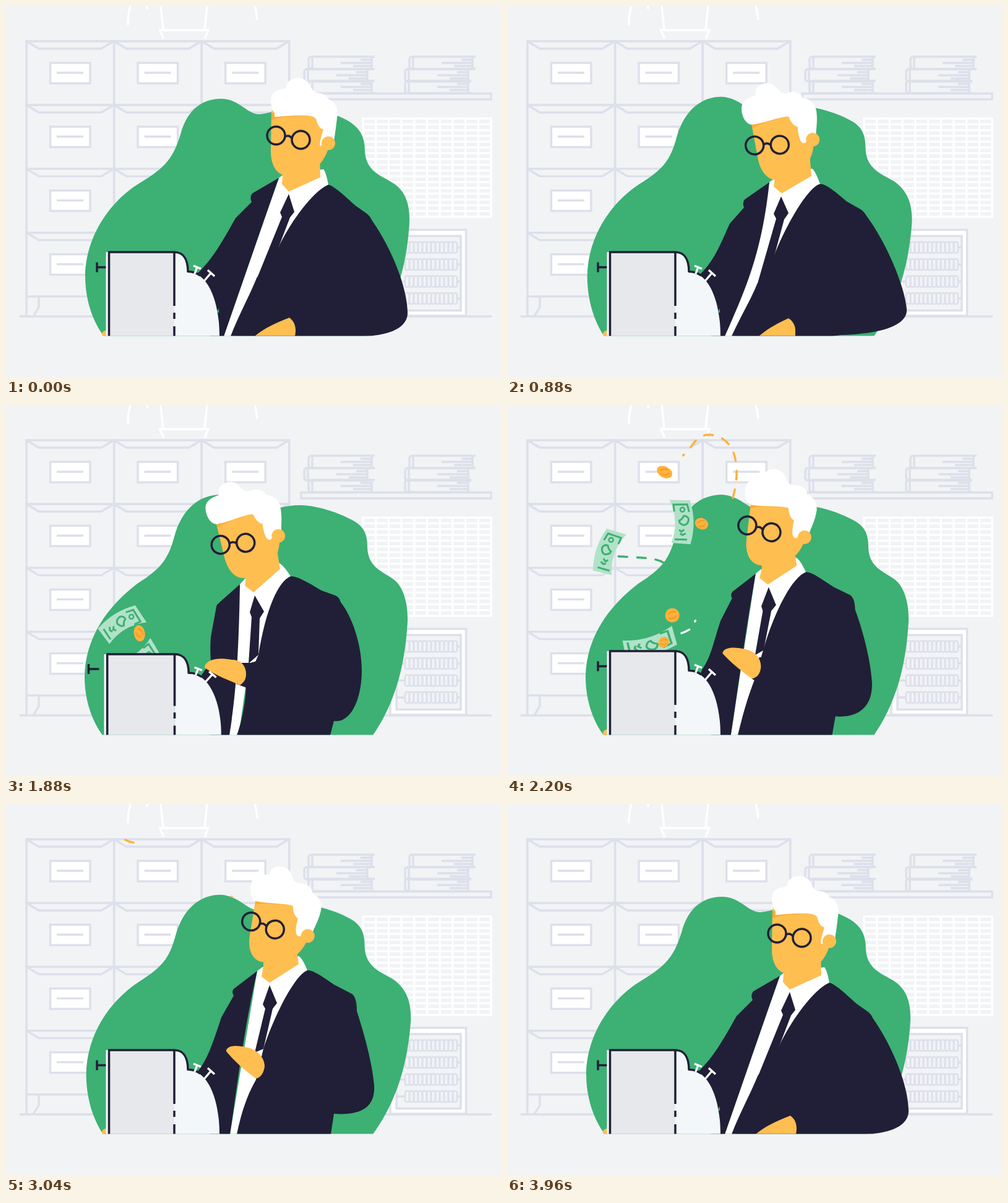
Recreate the animation shown at these times as an HTML page. Size 800 by 600 pixels, loop 4000 ms.

```html
<!DOCTYPE html>
<html lang="en">
<head>
<meta charset="utf-8">
<title>Accountant at the money machine</title>
<style>
html, body { margin: 0; width: 100%; height: 100%; overflow: hidden; background: #f1f3f5; }
svg { display: block; width: 100vw; height: 100vh; }
.line { fill: none; stroke: #dddfea; stroke-width: 3.4; }
.white { fill: none; stroke: #fff; stroke-width: 3.4; }
.ink { fill: none; stroke: #211f37; stroke-width: 3.5; }
.navy { fill: #211f37; }
.skin { fill: #ffbe50; }
.trail { fill: none; stroke-width: 3.4; stroke-linecap: round; }
</style>
</head>
<body>
<svg viewBox="0 0 800 600">
  <defs>
    <clipPath id="desk"><rect width="800" height="533.5"/></clipPath>
    <g id="note">
      <path d="M-21 -33L12 -35Q26 0 18 36L-13 36Q-2 0 -21 -33Z" fill="#b1e2c8"/>
      <path d="M-12 -15L-14 -26L8 -28L12 -16M-8 30L12 29M-2 14l4 3 4 -4M0 20l4 2 5 -3M4 -9a7 6 0 0 1 8 7q-1 7 -7 8q-8 -2 -8 -7q4 -1 7 -8Z" fill="none" stroke="#3db074" stroke-width="3"/>
      <circle cx="1" cy="-19" r="3.5" fill="none" stroke="#3db074" stroke-width="2.5"/>
    </g>
    <g id="coin">
      <ellipse rx="12" ry="10" fill="#ffb13c"/>
      <path d="M-7 2Q-5 -6 3 -6M-3 6Q5 5 6 -2" fill="none" stroke="#f39a24" stroke-width="2"/>
    </g>
  </defs>
  <g id="room"></g>
  <g clip-path="url(#desk)">
    <path id="blob" fill="#3db074"/>
  </g>
  <g id="money"></g>
  <g clip-path="url(#desk)">
    <path id="shirt" fill="#fff"/>
    <path id="left" class="navy"/>
    <path id="gap" fill="#3db074"/>
    <path id="tie" class="navy"/>
    <path id="jacket" class="navy"/>
    <path id="sleeve" class="navy"/>
    <path id="neck" class="skin"/>
    <g id="head">
      <path class="skin" d="M398 160L397 226C397 250 408 265 424 265L450 264L477 245C487 234 493 215 494 200L460 150Z"/>
      <path d="M398 164V175Q418 168 444 169Z" fill="#fbab35"/>
      <path id="hair" fill="#fff"/>
      <circle class="skin" cx="490" cy="212.5" r="11"/>
      <g id="glasses" class="ink">
        <circle cx="396" cy="203" r="14.5"/>
        <circle cx="436" cy="210" r="14.5"/>
        <path d="M410 205Q417 201 422 208"/>
      </g>
    </g>
    <path id="hand" class="skin"/>
    <circle id="thumb" class="skin" cx="161"/>
    <path id="lever" class="ink" d="M147 414.5V430.5M147 422.5H164"/>
    <g id="machine">
      <path d="M161.5 398H168V534H161.5Z" fill="#f3f7f9"/>
      <path d="M272 398C288 398 294 412 294 430C325 430 345 475 345 534H272Z" fill="#f3f7f9"/>
      <path d="M166 398H272V534H166Z" fill="#e7e8ec"/>
      <path class="ink" stroke-linejoin="round" d="M166.5 534V398H272C288 398 294 412 294 429.5Q304 429 314 436M272 398V485M272 496V506M272 518V534"/>
      <path class="white" d="M303 420L315 425M309 422L305 433M326 427L337 437M331 432L320 445"/>
    </g>
  </g>
</svg>
<script>
const LOOP = 4000;
const $ = id => document.getElementById(id);
const svgTag = (cls, d) => `<path class="${cls}" d="${d}"/>`;

function drawRoom() {
  let out = svgTag('white', 'M250 0L254 38M325 0L321 38M255 53L248.5 39H327L321 53M201 0Q197 14 197 31M228 0V5M402 0Q405 10 406 23');
  out += svgTag('line', 'M22 502H785M33 470V502M53 470V487L44 502');
  for (let row = 0; row < 4; row++) for (let col = 0; col < 3; col++) {
    const x = 33 + col * 141.6, y = 57 + row * 103.2;
    out += svgTag('line', `M${x} ${y}h141.6v103.2h-141.6ZM${x} ${y}l20 12h101l20 -12`);
    out += `<rect class="line" style="fill:#fff" x="${x + 38.5}" y="${y + 35}" width="64.5" height="33"/>`;
    out += svgTag('line', `M${x + 49} ${y + 51}h43`);
  }
  const book = (x, y) => svgTag('line', `M${x + 107} ${y}H${x + 5}q-5 0 -5 5v10q0 5 5 5H${x + 107}M${x + 6} ${y}v20M${x + 102} ${y}v20M${x + 84} ${y + 5}h18M${x + 52} ${y + 10}h50M${x + 72} ${y + 15}h30`);
  out += [[489, 82], [482, 102], [489, 121], [652, 82], [645, 102], [645, 121]].map(p => book(...p)).join('');
  out += svgTag('line', 'M477 141.5H784V151H477Z');

  let grid = 'M577 182H784V341H577Z';
  for (let i = 1; i < 10; i++) grid += `M${784 - i * 20.7} 182V341`;
  for (let i = 1; i < 17; i++) grid += `M577 ${182 + i * 9.35}H784`;
  out += svgTag('white', grid);

  out += '<rect class="line" style="fill:#fff" x="621" y="362" width="122.5" height="139"/>';
  out += '<rect class="line" style="fill:#f1f3f5" x="631" y="372" width="104" height="120.5"/>';
  for (let row = 0; row < 4; row++) {
    const y = 390.5 + row * 27.5;
    out += svgTag('line', `M631 ${y}H645M729 ${y}H735`);
    for (let i = 0; i < 12; i++)
      out += `<rect class="line" style="stroke-width:2.6" x="${645 + i * 7}" y="${y - 9}" width="7" height="18" rx="3"/>`;
  }
  $('room').innerHTML = out;
}

const tuckedSleeve = 'M470 480L480 480L490 490L500 500L490 510L480 510L470 490Z';
const smallGap = 'M344 489L341 494L344 497Z';
const hiddenGap = 'M330 489L328 494L330 497Z';

// Head: dx, dy, rotation, turn towards the viewer.
const resting = {
  head: '31 9.5 0 1',
  left: 'M441 278L398 303Q393 309 397 317L371 343C350 380 335 408 310 432L300 470L330 534L352 534C382 448 411 363 441 278Z',
  gap: smallGap,
  shirt: 'M441 278L449 272L513 264Q517 268 521 289L436 402L405 445L370 534L352 534Z',
  tie: 'M457 304L466 333L459 342L436 402L405 442L446 341L443 334Z',
  jacket: 'M521 289C495 300 455 355 436 400L405 440C393 470 376 500 363 534L560 534L580 534C630 532 650 515 649 495C648 455 625 395 591 346Q588 339 582 335L565 323C545 305 530 291 521 289Z',
  sleeve: tuckedSleeve,
  neck: 'M447 260L447 275L446 288L457 300L508 277L507 242Z',
  hand: 'M402 534C415 523 430 515 458 504C466 510 468 518 468 525C468 530 467 533 467 534C440 535 420 535 402 534Z'
};
const lookingDown = {
  head: '4.5 18.5 -11.5 0',
  left: 'M424 285L384 313Q380 318 383 326L360 352C345 385 335 412 312 434L300 470L330 534L352 534C385 460 412 400 424 285Z',
  gap: smallGap,
  shirt: 'M424 285L432 279L493 263Q498 266 506 288L432 404L404 452L370 534L352 534Z',
  tie: 'M443 308L455 335L448 345L432 404L404 452L435 344L431 336Z',
  jacket: 'M506 288C490 290 455 345 432 403L404 450C394 475 376 505 363 534L526 534L540 532C610 530 648 515 646 490C643 455 615 385 580 338Q576 331 570 328L549 316C530 300 515 287 506 288Z',
  sleeve: tuckedSleeve,
  neck: 'M433 268L433 278L431 292L444 303L492 275L489 238Z',
  hand: 'M407 534C420 523 435 514 455 505C463 510 466 518 466 525C466 530 466 533 466 534C440 535 422 535 407 534Z'
};
const handRaised = {
  head: '0 0 0 0',
  left: 'M411 275L381 296Q370 310 362 330L345 350C330 390 320 410 300 428L300 470L330 534L357 534C380 470 385 400 411 275Z',
  gap: 'M351 464L338 484L346 504Z',
  shirt: 'M411 275L419 269L481 254Q486 256 493 279L430 372L399 430L372 534L357 534Z',
  tie: 'M429 298L440 326L432 334L428 370L414 354L419 333L416 324Z',
  jacket: 'M493 279C475 285 445 325 430 371L399 430C397 460 375 495 367 534L525 534L535 505C550 460 556 420 559 390C561 375 562 365 563 355Q569 325 556 319L535 311C518 295 503 278 493 279Z',
  sleeve: 'M358 336L388 318L430 371L460 400L399 430L384 404L366 350Z',
  neck: 'M421 255L420 268L418 284L429 293L479 267L476 234Z',
  hand: 'M347 281C346 272 356 270 366 277C378 288 384 302 388 318C387 332 373 341 360 339C356 320 350 300 347 281Z'
};
const pressing = {
  head: '-49 18 -14.5 0',
  left: 'M378 290L343 321Q341 322 340 326L331 375C330 390 330 400 331 415L300 460L330 534L361 534C370 480 376 420 378 290Z',
  gap: hiddenGap,
  shirt: 'M378 290L386 281L440 255Q447 257 460 277L408 405L388 450L376 534L361 534Z',
  tie: 'M402 308L417 334L410 345L408 404L392 418L397 343L394 335Z',
  jacket: 'M460 277C440 285 420 330 408 404L388 450C388 475 382 510 373 534L524 534L530 511C560 515 575 470 575 430C575 385 558 340 541 319Q539 311 532 308L510 300C490 288 470 276 460 277Z',
  sleeve: 'M378 417L395 417L420 410L440 440L420 470L388 457L372 451Z',
  neck: 'M388 265L388 277L386 292L400 303L443 265L437 228Z',
  hand: 'M321 423C325 410 345 408 365 412C380 412 388 422 388 435C388 445 383 450 378 453C360 445 340 438 321 425Z'
};
const watching = {
  head: '6 -14.5 13 0',
  left: 'M410 267L372 295Q367 302 372 308L350 340C335 380 330 410 310 432L300 470L330 534L362 534C372 470 385 370 410 267Z',
  gap: hiddenGap,
  shirt: 'M410 267L418 261L476 244Q482 246 491 268L417 395L404 443L376 534L362 534Z',
  tie: 'M430 290L441 320L433 329L417 394L404 400L419 330L417 322Z',
  jacket: 'M491 268C470 275 438 330 416 394L404 443C390 470 380 500 373 534L526 534L531 501C575 504 597 490 595 455C592 420 580 370 570 335Q570 310 560 306L535 293C515 280 500 267 491 268Z',
  sleeve: 'M418 405L425 405L450 420L450 450L430 460L412 446L404 440Z',
  neck: 'M420 245L420 260L416 276L429 286L477 258L474 235Z',
  hand: 'M358 392C362 384 378 385 395 390C410 395 419 408 418 420C417 432 410 439 402 439C385 425 370 410 358 394Z'
};
const relaxing = {
  head: '-0.5 -10 8.5 0',
  left: 'M406 270L368 299Q364 303 368 310L348 345C335 385 325 415 310 432L300 470L330 534L362 534C372 470 383 370 406 270Z',
  gap: hiddenGap,
  shirt: 'M406 270L414 264L473 246Q479 249 487 269L416 397L404 446L376 534L362 534Z',
  tie: 'M426 293L438 322L431 331L416 396L402 402L419 331L415 324Z',
  jacket: 'M487 269C470 275 438 330 416 396L404 446C390 470 380 500 373 534L525 534L530 501C575 504 597 490 595 455C592 420 580 375 567 335Q567 310 557 306L530 292C515 282 497 268 487 269Z',
  sleeve: 'M418 409L425 409L450 424L450 454L430 464L412 450L404 444Z',
  neck: 'M416 248L416 262L413 279L426 289L473 259L470 236Z',
  hand: 'M356 398C360 389 376 390 395 395C410 401 418 412 418 425C416 437 410 443 404 444C385 430 368 415 356 400Z'
};
const bodyParts = ['left', 'gap', 'shirt', 'tie', 'jacket', 'sleeve', 'neck', 'hand'];

const hairSide = 'M398 169C388 166 384 150 388 137C392 127 404 125 414 124C413 114 421 108 431 108C443 107 449 117 451 122C455 130 460 131 466 130C478 129 487 136 487 143C498 146 505 156 505 167C504 185 499 195 497 205L486 202C483 212 479 216 474 215C468 212 469 200 470 187C464 184 461 178 459 168C446 165 420 171 398 169Z';
const hairTurned = 'M403 163C397 158 396 141 399 134C403 127 413 125 421 124C422 113 430 107 441 107C451 107 459 113 461 120C464 127 467 130 473 131C483 132 489 137 490 141C500 145 505 154 505 163C503 181 501 196 499 209L489 202C485 212 480 217 477 217C474 215 480 197 482 190C474 188 472 180 470 173C463 164 434 168 403 170Z';

const blobLow = 'M158 534C140 510 128 475 128 437C129 370 170 315 215 287C260 260 270 245 282 208C293 165 320 150 347 150C378 150 388 175 410 175C430 173 455 163 476 163C510 165 540 178 555 187C575 200 580 215 580 235C582 270 610 275 628 288C645 300 653 320 652 350C648 420 630 480 593 534Z';
const blobWide = 'M157 534C141 510 130 475 130 437C131 372 168 318 214 288C256 262 265 247 275 210C289 165 317 147 347 147C378 149 388 172 410 173C430 172 453 162 476 162C510 164 545 178 560 188C576 199 579 213 579 230C580 265 606 272 626 284C648 300 656 320 655 350C650 420 632 480 593 534Z';
const blobHigh = 'M156 534C138 510 127 475 127 440C128 375 165 325 212 289C250 265 262 250 272 213C285 165 315 145 347 145C378 147 388 168 410 170C430 171 450 162 476 162C510 163 545 178 563 188C580 198 584 212 584 228C584 260 605 268 622 279C642 290 650 320 649 350C645 420 630 480 593 534Z';

const bodyKeys = [
  [0, resting], [240, resting], [820, lookingDown], [1060, lookingDown], [1360, handRaised], [1520, handRaised],
  [1840, pressing], [1960, pressing], [2320, watching], [2600, watching], [3000, relaxing], [3080, relaxing],
  [3440, resting], [LOOP, resting]
];
const blobKeys = [[0, blobLow], [700, blobWide], [1640, blobHigh], [2360, blobHigh], [3240, blobWide], [LOOP, blobLow]];

// kind, x, y, rotation, x scale, y scale, start time
const items = [
  ['note', 286, 172, 0, 1, 1, 1860],
  ['note', 164, 233, 12, -1, 1, 1790],
  ['note', 256, 333, 45, .95, 1.2, 2080],
  ['coin', 257, 93, 25, 1.1, .9, 1840],
  ['coin', 330, 157, 15, .92, .9, 1920],
  ['coin', 312, 268, 0, .96, 1.15, 2060],
  ['coin', 334, 289, 0, .67, .95, 2120]
];
// path, colour, head start and end, tail start and end
const trails = [
  ['M365 150C377 108 375 50 325 48C300 50 300 75 275 88C250 98 222 85 219 62C219 48 230 40 234 42C235 52 214 74 188 55', '#ffb13c', 1900, 2480, 2540, 3080],
  ['M253 255C238 246 212 247 183 245C145 244 140 183 184 177', '#3db074', 1960, 2420, 2520, 2960],
  ['M231 397C247 370 275 376 295 363C309 350 309 330 303 309', '#fff', 1840, 2360, 2560, 2900]
];

const clamp = v => Math.max(0, Math.min(1, v));
const ramp = (t, a, b) => clamp((t - a) / (b - a));
const smooth = k => k * k * (3 - 2 * k);
const easeOut = k => 1 - (1 - k) ** 3;
const bump = (t, mid, width) => smooth(clamp(1 - Math.abs(t - mid) / width));
const set = (id, name, value) => $(id).setAttribute(name, value);

function mix(a, b, k) {
  const to = b.match(/-?[\d.]+/g);
  let i = 0;
  return a.replace(/-?[\d.]+/g, n => +(+n + (to[i++] - n) * k).toFixed(2));
}

function between(keys, t) {
  const i = keys.findIndex(key => key[0] > t);
  const [t0, from] = keys[i - 1], [t1, to] = keys[i];
  return [from, to, smooth(ramp(t, t0, t1))];
}

function drawBody(t) {
  const [from, to, k] = between(bodyKeys, t);
  for (const part of bodyParts) set(part, 'd', mix(from[part], to[part], k));
  const [dx, dy, angle, turn] = mix(from.head, to.head, k).split(' ').map(Number);
  set('head', 'transform', `translate(${dx} ${dy - 4 * bump(t, 160, 160)}) rotate(${angle} 416 206.5)`);
  set('glasses', 'transform', `translate(${turn * 9.5} ${turn * -3})`);
  set('hair', 'd', mix(hairSide, hairTurned, turn));
  set('blob', 'd', mix(...between(blobKeys, t)));
}

function drawMachine(t) {
  const press = bump(t, 1880, 130);
  set('machine', 'transform', `translate(256 533) scale(${1 + .032 * press} ${1 - .037 * press}) translate(-256 -533)`);
  set('lever', 'transform', `translate(${-13.5 * press} ${4.5 * press})`);
  set('thumb', 'cy', 531 - 16 * press);
  set('thumb', 'r', 6 - 3 * press);
}

function drawMoney(t) {
  trailNodes.forEach((node, i) => {
    const [, , headStart, headEnd, tailStart, tailEnd] = trails[i];
    const head = lengths[i] * ramp(t, headStart, headEnd), tail = lengths[i] * ramp(t, tailStart, tailEnd);
    const first = Math.ceil(tail / 30) * 30, dashes = [0, first];
    for (let p = first; p < head; p += 30) dashes.push(Math.min(14, head - p), p + 30 < head ? 16 : 999);
    node.style.display = first < head ? '' : 'none';
    node.setAttribute('stroke-dasharray', dashes.join(' '));
  });
  itemNodes.forEach((node, i) => {
    const [, x, y, angle, sx, sy, start] = items[i];
    const k = easeOut(ramp(t, start, start + 560)), size = 1 - smooth(ramp(t, 2660, 2960));
    const px = 205 + (x - 205) * k, py = 440 + (y - 440) * k;
    node.style.display = t > start && size > 0 ? '' : 'none';
    node.setAttribute('transform', `translate(${px} ${py}) rotate(${angle + 70 * (1 - k)}) scale(${sx * size} ${sy * size})`);
  });
}

drawRoom();
$('money').innerHTML = trails.map(([d, colour]) => `<path class="trail" d="${d}" stroke="${colour}"/>`).join('')
  + items.map(([kind]) => `<use href="#${kind}"/>`).join('');
const trailNodes = [...document.querySelectorAll('.trail')];
const itemNodes = [...document.querySelectorAll('#money use')];
const lengths = trailNodes.map(node => node.getTotalLength());

function frame() {
  const t = performance.now() % LOOP;
  drawBody(t);
  drawMachine(t);
  drawMoney(t);
  requestAnimationFrame(frame);
}
frame();
</script>
</body>
</html>
```
